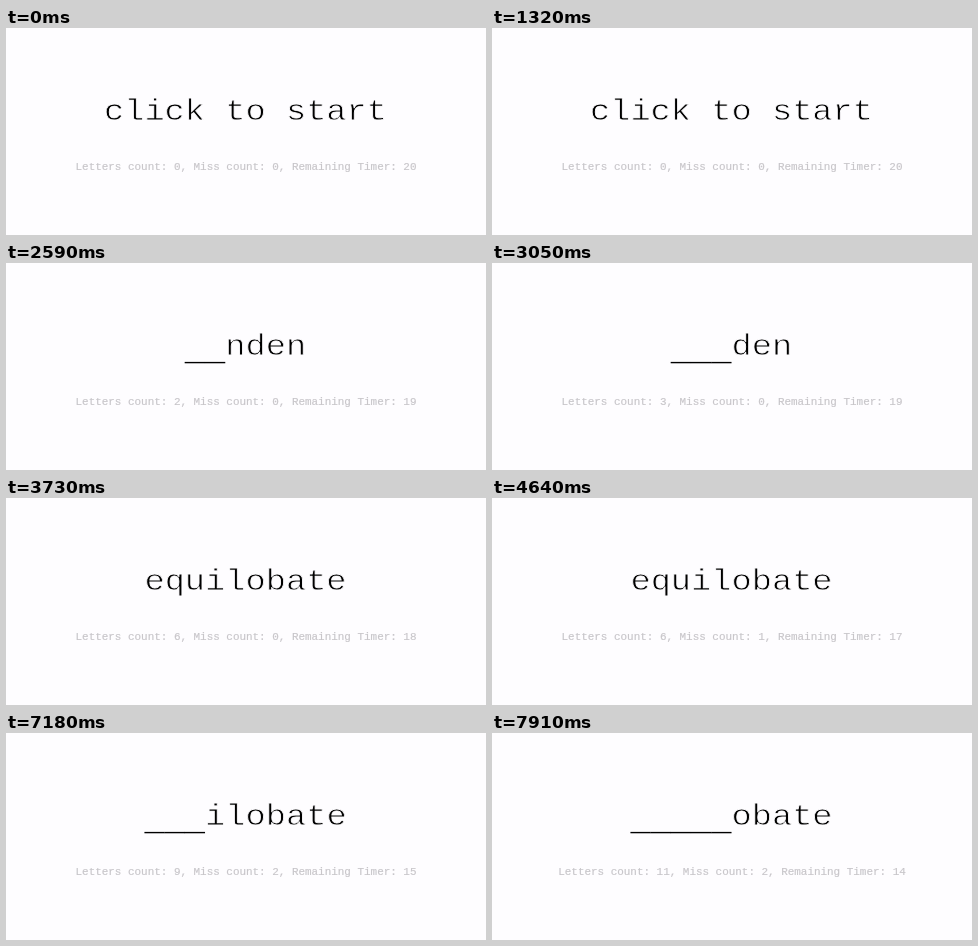
An HTML page for the animation above (8000 ms loop, 480 by 207 pixels).

```html
<!DOCTYPE html>
<html lang="en">
<head>
<meta charset="utf-8">
<title>Typing game</title>
<style>
  html, body { margin: 0; width: 100%; height: 100%; overflow: hidden; background: #fefdff; }
  svg { display: block; width: 480px; height: 207px; }
  text { font-family: "Liberation Mono", "Courier New", monospace; text-anchor: middle; }
  #word { font-size: 33.7px; fill: #000; stroke: #fefdff; stroke-width: .9px; }
  #typed { stroke: none; baseline-shift: -5px; }
  #status { font-size: 10.95px; fill: #c8c6ca; stroke: #c8c6ca; stroke-width: .2px; }
</style>
</head>
<body>
<svg viewBox="0 0 480 207">
  <text id="word" transform="translate(239.5 92) scale(1 .88)"><tspan id="typed"></tspan><tspan id="rest"></tspan></text>
  <text id="status" transform="translate(240 142.2) scale(1 .95)"></text>
</svg>
<script>
const LOOP = 8000, START = 1500, SECONDS = 20;
const words = ["linden", "equilobate"];
const hits = [2140, 2590, 3050, 3500, 3590, 3730, 6640, 7000, 7180, 7550, 7820];
const misses = [4640, 5230];

const byId = id => document.getElementById(id);
const typed = byId("typed"), rest = byId("rest"), statusLine = byId("status");
const countUntil = (times, t) => times.filter(time => time <= t).length;
const setText = (node, text) => { if (node.textContent !== text) node.textContent = text; };

function wordAt(t, letters) {
  if (t < START) return ["click to start", 0];
  const first = words[0].length;
  return letters < first ? [words[0], letters] : [words[1], letters - first];
}

function draw(t) {
  const letters = countUntil(hits, t);
  const [word, done] = wordAt(t, letters);
  const left = SECONDS - Math.max(0, Math.floor((t - START) / 1000));
  setText(typed, "_".repeat(done));
  setText(rest, word.slice(done));
  setText(statusLine, `Letters count: ${letters}, Miss count: ${countUntil(misses, t)}, Remaining Timer: ${left}`);
}

const begin = performance.now();
function frame() {
  draw((performance.now() - begin) % LOOP);
  requestAnimationFrame(frame);
}
frame();
</script>
</body>
</html>
```
